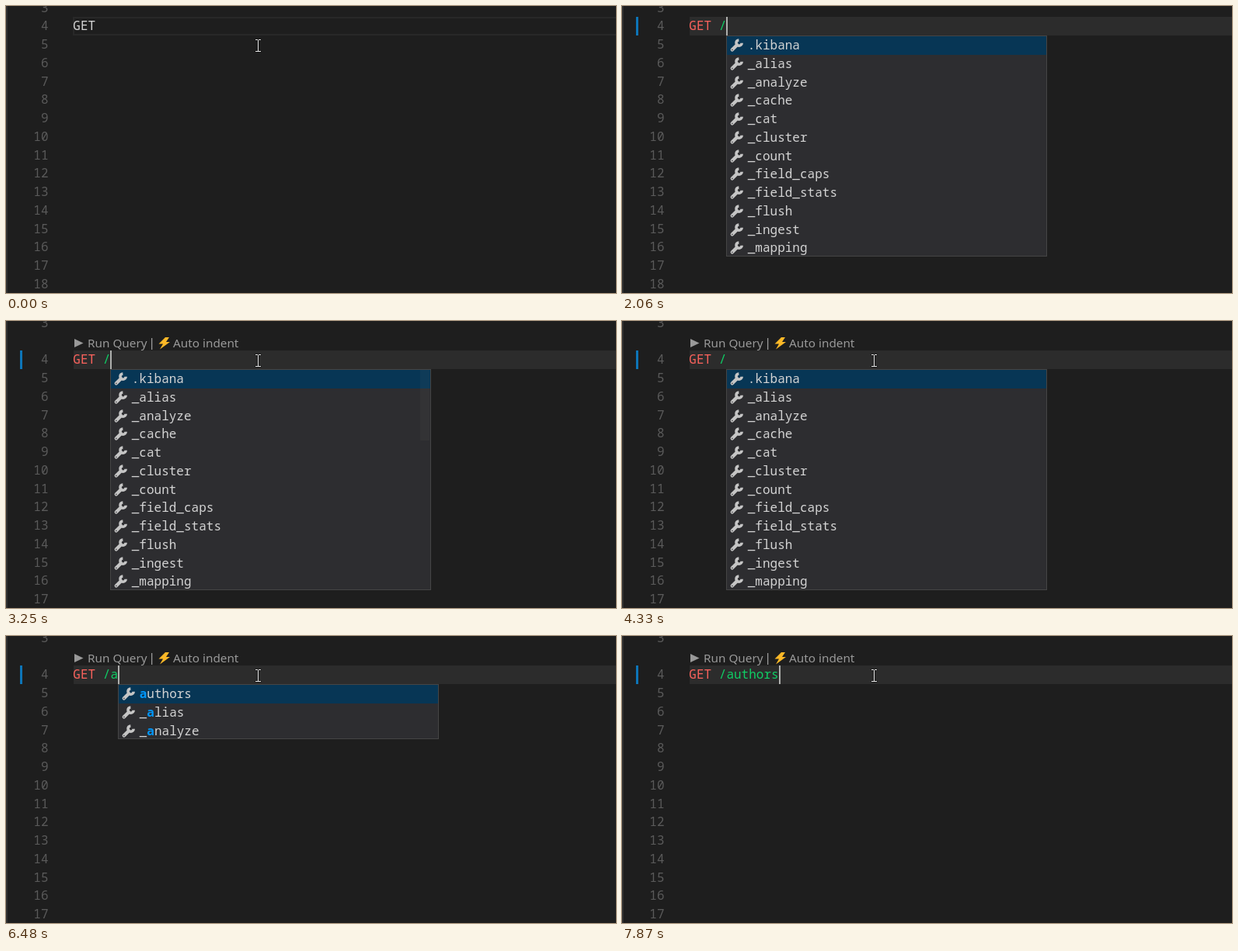
Write an HTML page with a canvas that moves like this. It is 785 px wide and 370 px high and loops after 8 s.

```html
<!DOCTYPE html>
<html lang="en">
<head>
<meta charset="utf-8">
<title>Query completion</title>
<style>
html, body { margin: 0; width: 100%; height: 100%; overflow: hidden; background: #1e1e1e; }
canvas { display: block; }
</style>
</head>
<body>
<canvas id="stage" width="785" height="370"></canvas>
<script>
const ctx = document.getElementById('stage').getContext('2d');
const LOOP = 8000, ROW = 23.75, CHAR = 9.62, LEFT = 86.3;
const MONO = '16.03px "Noto Sans Mono", "DejaVu Sans Mono", monospace';
const SANS = '15.3px "Noto Sans", "Open Sans", sans-serif';
const ALL = ['.kibana', '_alias', '_analyze', '_cache', '_cat', '_cluster', '_count',
  '_field_caps', '_field_stats', '_flush', '_ingest', '_mapping'];

// Start times of the typed line, the suggestions and the caret state.
const TYPED = [[0, 'GET'], [830, 'GET '], [1980, 'GET /'], [6480, 'GET /a'],
  [6790, 'GET /au'], [7850, 'GET /authors']];
const LISTS = [[0, []], [2060, ALL], [6480, ['authors', '_alias', '_analyze']],
  [6790, ['authors']], [7850, []]];
const BLINKS = [140, 600, 830, 1290, 1830, 2430, 2880, 3390, 3850, 4330, 4790,
  5310, 5850, 6330, 6480, 7250, 7870];

const at = (steps, t) => steps.filter(s => s[0] <= t).pop()[1];
const clamp = v => Math.max(0, Math.min(1, v));

function rect(x, y, w, h, color) {
  ctx.fillStyle = color;
  ctx.fillRect(x, y, w, h);
}

function text(str, x, y, color, font = MONO) {
  ctx.font = font;
  ctx.fillStyle = color;
  ctx.fillText(str, x, y);
}

function shape(points, color) {
  ctx.fillStyle = color;
  ctx.beginPath();
  points.forEach(p => ctx.lineTo(...p));
  ctx.fill();
}

function wrench(x, y) {
  ctx.save();
  ctx.translate(x, y);
  ctx.strokeStyle = '#c5c5c5';
  ctx.lineWidth = 3.6;
  ctx.beginPath();
  ctx.arc(11.6, 5.6, 3.6, 0.05, 4.65);
  ctx.stroke();
  ctx.lineWidth = 4.4;
  ctx.lineCap = 'round';
  ctx.beginPath();
  ctx.moveTo(9, 8.2);
  ctx.lineTo(2.8, 14.4);
  ctx.stroke();
  rect(2.2, 13.8, 1.3, 1.3, '#2d2d30');
  ctx.restore();
}

function lineNumbers(shift) {
  ctx.textAlign = 'right';
  for (let n = 3; n <= 18; n++) {
    text(n, 54.5, Math.round(31.3 + (n - 4) * ROW + (n > 3 ? shift : 0)), '#5a5a5a');
  }
  ctx.textAlign = 'left';
}

function codeLens() {
  shape([[88, 23], [99.5, 28.5], [88, 34]], '#999');
  text('Run Query', 105, 34, '#999', SANS);
  rect(187, 22, 1.3, 15, '#999');
  shape([[205, 21], [210, 21], [206, 27], [211, 27], [198, 36.5], [202, 29.5], [196.5, 29.5]], '#fcb827');
  text('Auto indent', 215, 34, '#999', SANS);
}

function popup(items, match, x, y, barAlpha) {
  const h = Math.round(items.length * ROW);
  rect(x, y, 413, h, '#454545');
  rect(x + 1, y + 1, 411, h - 2, '#2d2d30');
  rect(x + 1, y + 1, 411, Math.min(24, h - 2), '#073655');
  ctx.save();
  ctx.beginPath();
  ctx.rect(x + 1, y + 1, 411, h - 2);
  ctx.clip();
  items.forEach((item, i) => {
    const top = Math.round(y + i * ROW);
    wrench(x + 5, top + 4);
    text(item, x + 27.7, top + 18, '#d4d4d4');
    if (match) {
      const start = item.indexOf(match), mx = x + 27.7 + start * CHAR;
      rect(mx, top + 3, match.length * CHAR, 17, i ? '#2d2d30' : '#073655');
      text(match, mx, top + 18, '#0097fb', 'bold ' + MONO);
    }
  });
  ctx.restore();
  rect(x + 399, y + 1, 12, 91, `rgba(121,121,121,${0.4 * barAlpha})`);
}

function pointer() {
  for (const [color, grow] of [['#111', 1], ['#e8e8e8', 0]]) {
    const g = grow * 0.5;
    rect(324 - g, 44 - g, 1 + grow, 15 + grow, color);
    for (const y of [43, 58]) {
      rect(321 - g, y - g, 3 + grow, 1 + grow, color);
      rect(325 - g, y - g, 3 + grow, 1 + grow, color);
    }
  }
}

function draw(t) {
  const line = at(TYPED, t), items = at(LISTS, t);
  const shift = t >= 2430 ? 24 : 0, y = 14 + shift;
  rect(0, 0, 785, 370, '#1e1e1e');
  rect(0, 0, 2, 370, '#303030');

  if (t >= 1980) {
    rect(87, y, 698, 24, '#2c2c2c');
    rect(18, y, 3, 24, '#0d75b8');
  } else {
    ctx.strokeStyle = '#282828';
    ctx.lineWidth = 2;
    ctx.strokeRect(87, 15, 710, 22);
  }
  lineNumbers(shift);
  if (t >= 2810) codeLens();

  text('GET', LEFT, y + 17, t >= 1980 ? '#f9625c' : '#d4d4d4');
  text(line.slice(4), LEFT + 4 * CHAR, y + 17, '#0fce65');
  pointer();

  if (items.length) {
    const fade = t < 2810 ? clamp((t - 2060) / 80) : clamp(1 - (t - 2640) / 750);
    const x = Math.round(LEFT + line.length * CHAR);
    popup(items, line.slice(5), x, y + 24, items === ALL ? fade : 0);
  }
  if (BLINKS.filter(b => b <= t).length % 2) {
    rect(Math.round(LEFT + line.length * CHAR), y, 2, 24, '#aeafad');
  }
}

const begin = performance.now();
function frame() {
  draw((performance.now() - begin) % LOOP);
  requestAnimationFrame(frame);
}
frame();
</script>
</body>
</html>
```
